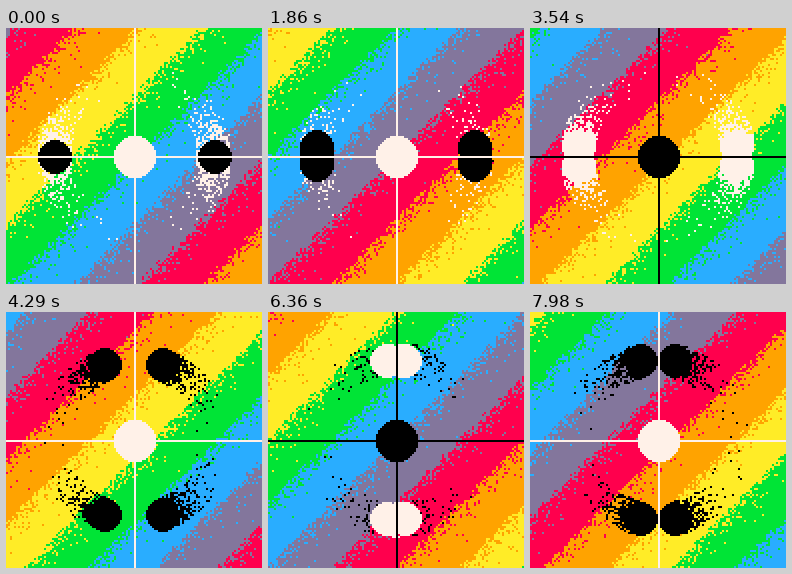
These frames come from a looping animation (256x256 px, 8000 ms). An HTML page with a canvas:

```html
<!DOCTYPE html>
<html lang="en">
<head>
<meta charset="utf-8">
<title>Rainbow orbits</title>
<style>
html, body { margin: 0; width: 100%; height: 100%; overflow: hidden; background: #000; }
canvas { display: block; width: 100vw; height: 100vh; image-rendering: pixelated; }
</style>
</head>
<body>
<canvas width="128" height="128"></canvas>
<script>
const SIZE = 128, MID = 64, ORBIT = 40;
const STEP_MS = 30, LOOP_MS = 8000, STEPS_PER_BEAT = 30;
const WARM_UP = 60, DOTS_PER_STEP = 4000;

const ctx = document.querySelector('canvas').getContext('2d');
const image = ctx.createImageData(SIZE, SIZE);
const pixels = new Uint32Array(image.data.buffer);

// Packs 0xRRGGBB as little-endian RGBA.
const pack = c => (0xff000000 | (c & 255) << 16 | (c & 0xff00) | c >> 16) >>> 0;
const RAINBOW = [0xff004d, 0xffa300, 0xffec27, 0x00e436, 0x29adff, 0x83769c].map(pack);
const BLACK = pack(0x000000), WHITE = pack(0xfff1e8);

let seed, step = Infinity;

function random() {
  seed = (seed + 0x6d2b79f5) | 0;
  let h = Math.imul(seed ^ seed >>> 15, 1 | seed);
  h = (h + Math.imul(h ^ h >>> 7, 61 | h)) ^ h;
  return (h ^ h >>> 14) >>> 0;
}

function paintBand(i, beat) {
  const band = Math.floor(((i & 127) + (i >> 7)) / 32 + beat);
  pixels[i] = RAINBOW[(band % 6 + 6) % 6];
}

function disc(cx, cy, r, color) {
  cx = Math.floor(cx + 1e-4);
  cy = Math.floor(cy + 1e-4);
  for (let y = -r; y <= r; y++)
    for (let x = -r; x <= r; x++)
      if (x * x + y * y < r * r + r) pixels[(cy + y) * SIZE + cx + x] = color;
}

function advance(n) {
  const beat = n / STEPS_PER_BEAT;
  const odd = Math.floor(beat) & 1;
  const axis = odd ? BLACK : WHITE, ball = odd ? WHITE : BLACK;

  // Only some pixels refresh each step, so old ones linger as trails.
  for (let k = 0; k < DOTS_PER_STEP; k++) paintBand(random() >>> 18, beat);

  const dx = ORBIT * Math.cos(beat * Math.PI / 2);
  const dy = ORBIT * Math.sin(beat * Math.PI / 2);
  for (const sx of [-1, 1])
    for (const sy of [-1, 1]) disc(MID + sx * dx, MID + sy * dy, 8, ball);

  disc(MID, MID, 10, axis);
  for (let k = 0; k < SIZE; k++)
    pixels[MID * SIZE + k] = pixels[k * SIZE + MID] = axis;
}

function restart() {
  seed = 7;
  step = -WARM_UP;
  for (let i = 0; i < pixels.length; i++) paintBand(i, step / STEPS_PER_BEAT);
}

const start = performance.now();

function render() {
  const target = Math.floor((performance.now() - start) % LOOP_MS / STEP_MS);
  if (target !== step) {
    if (target < step) restart();
    while (step < target) advance(++step);
    ctx.putImageData(image, 0, 0);
  }
  requestAnimationFrame(render);
}
render();
</script>
</body>
</html>
```
